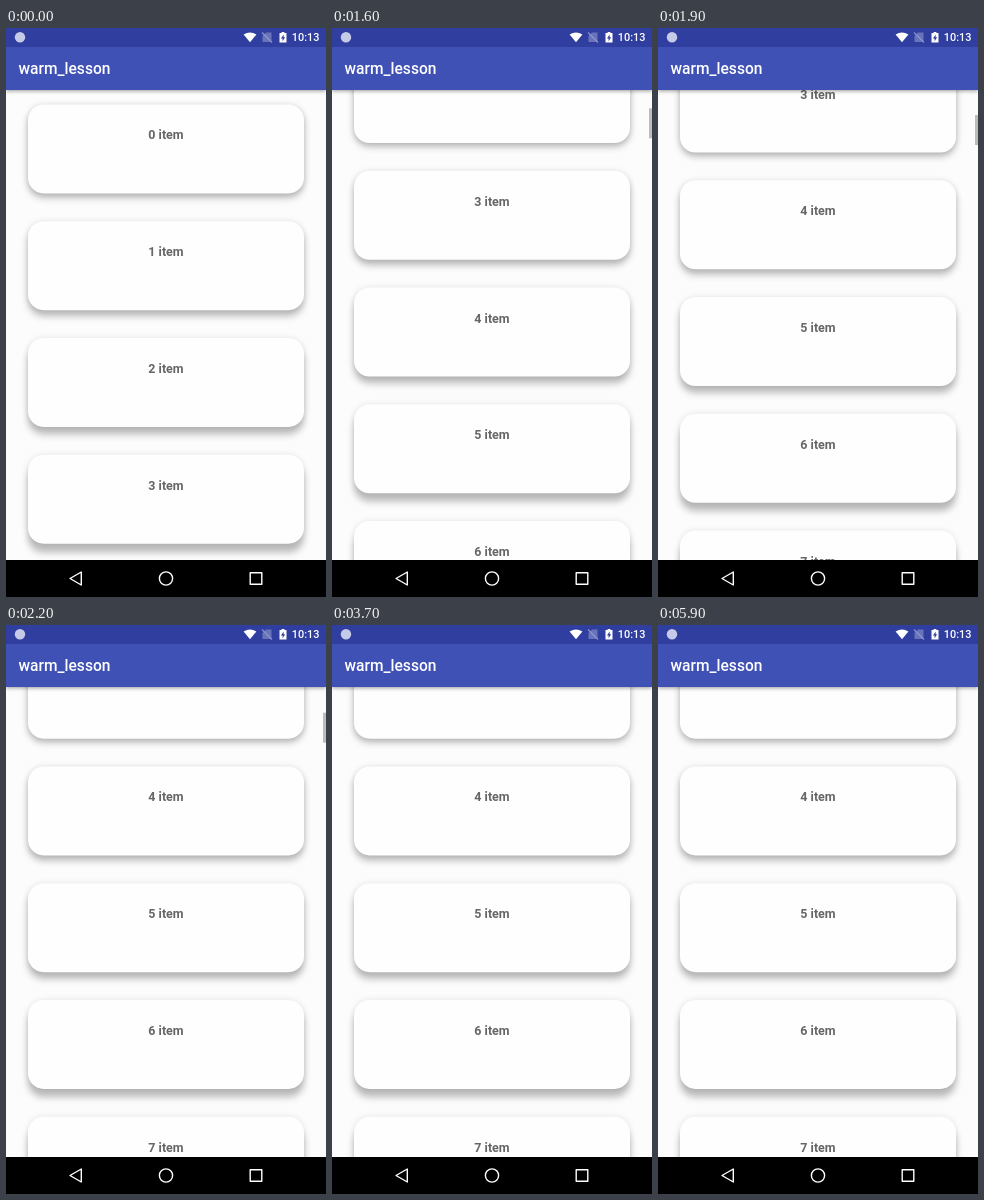
Animation of 320x569 px, one loop 6000 ms. Source, as an HTML page:

```html
<!DOCTYPE html>
<html lang="en">
<head>
<meta charset="utf-8">
<title>Scrolling list</title>
<style>
  html, body { margin: 0; width: 100%; height: 100%; overflow: hidden; background: #fcfcfc; }
  body { position: relative; font-family: Roboto, sans-serif; }
  .card {
    position: absolute; left: 21.8px; top: 0; width: 276.4px; height: 88.7px;
    border-radius: 15.6px; background: #fefefe; color: #666;
    font: 700 12.46px/62px Roboto, sans-serif; text-align: center;
  }
  #thumb { position: absolute; left: 317px; top: 0; width: 3px; height: 30px; background: #bcbcbc; }
  #bar {
    position: absolute; left: 0; top: 0; width: 320px; height: 62.3px;
    background: linear-gradient(#303f9f 18.5px, #3f51b5 18.5px);
    box-shadow: 0 1px 4px rgba(0, 0, 0, .4);
  }
  #nav { position: absolute; left: 0; top: 531.5px; width: 320px; height: 37.5px; background: #000; }
  svg { position: absolute; left: 0; top: 0; }
</style>
</head>
<body>
<div id="list"></div>
<div id="thumb"></div>
<div id="bar"></div>
<div id="nav"></div>
<svg width="320" height="569" fill="#fff">
  <circle cx="14" cy="9.3" r="5.2" fill="#c5cae9"/>
  <path d="M244 14.3 237.6 6.6Q244 2.2 250.4 6.6Z"/>
  <g opacity=".45">
    <path d="M260 4.5H265.5V14H256.5V8Z" opacity=".6"/>
    <path d="M256 4.5 266 14.5" stroke="#fff" stroke-width="1.1"/>
  </g>
  <path d="M275.6 4H278.4V5.1H280.5V14.6H273.5V5.1H275.6Z"/>
  <path d="M277.6 6.4 275 10.4H276.6V13.2L279.1 9.2H277.6Z" fill="#303f9f"/>
  <text x="285.8" y="13.4" font-size="10.9" font-weight="500">10:13</text>
  <text x="12.5" y="46" font-size="15.57" font-weight="500">warm_lesson</text>
  <g fill="none" stroke="#fff" stroke-width="1.4" stroke-linejoin="round">
    <path d="M64 550.5 75.3 544V557Z"/>
    <circle cx="160" cy="550.5" r="6.6"/>
    <rect x="244.2" y="544.7" width="11.6" height="11.6"/>
  </g>
</svg>
<script>
const LOOP = 6000, STEP = 100, FLING_START = 1400, END_SCROLL = 402;
const FIRST_TOP = 76.4, PITCH = 116.75;
const list = document.getElementById('list');
const thumb = document.getElementById('thumb');

const cards = Array.from({ length: 8 }, (_, i) => {
  const card = document.createElement('div');
  card.className = 'card';
  card.textContent = `${i} item`;
  return list.appendChild(card);
});

// The fling slows down along a cubic curve.
function scrollAt(time) {
  if (time < FLING_START) return 0;
  const left = Math.max(0, 7.47 - (time - FLING_START) / STEP);
  return END_SCROLL - (0.897 * left) ** 3;
}

function thumbOpacity(time) {
  if (time < FLING_START) return 0;
  return Math.min(1, Math.max(0, (2900 - time) / 400));
}

function draw(now) {
  const time = Math.floor((now % LOOP) / STEP) * STEP;
  const scroll = scrollAt(time);
  cards.forEach((card, i) => {
    const y = FIRST_TOP + i * PITCH - scroll;
    // Shadows drop further the lower a card sits below the light.
    const drop = 3.5 + Math.max(0, y) * 0.013;
    card.style.transform = `translateY(${y}px)`;
    card.style.boxShadow =
      `0 0 6px rgba(0,0,0,.1), 0 ${drop}px 7px rgba(0,0,0,.25)`;
  });
  thumb.style.transform = `translateY(${62.5 + scroll * 0.0627}px)`;
  thumb.style.opacity = thumbOpacity(time);
}

function tick() {
  draw(performance.now());
  requestAnimationFrame(tick);
}
tick();
</script>
</body>
</html>
```
